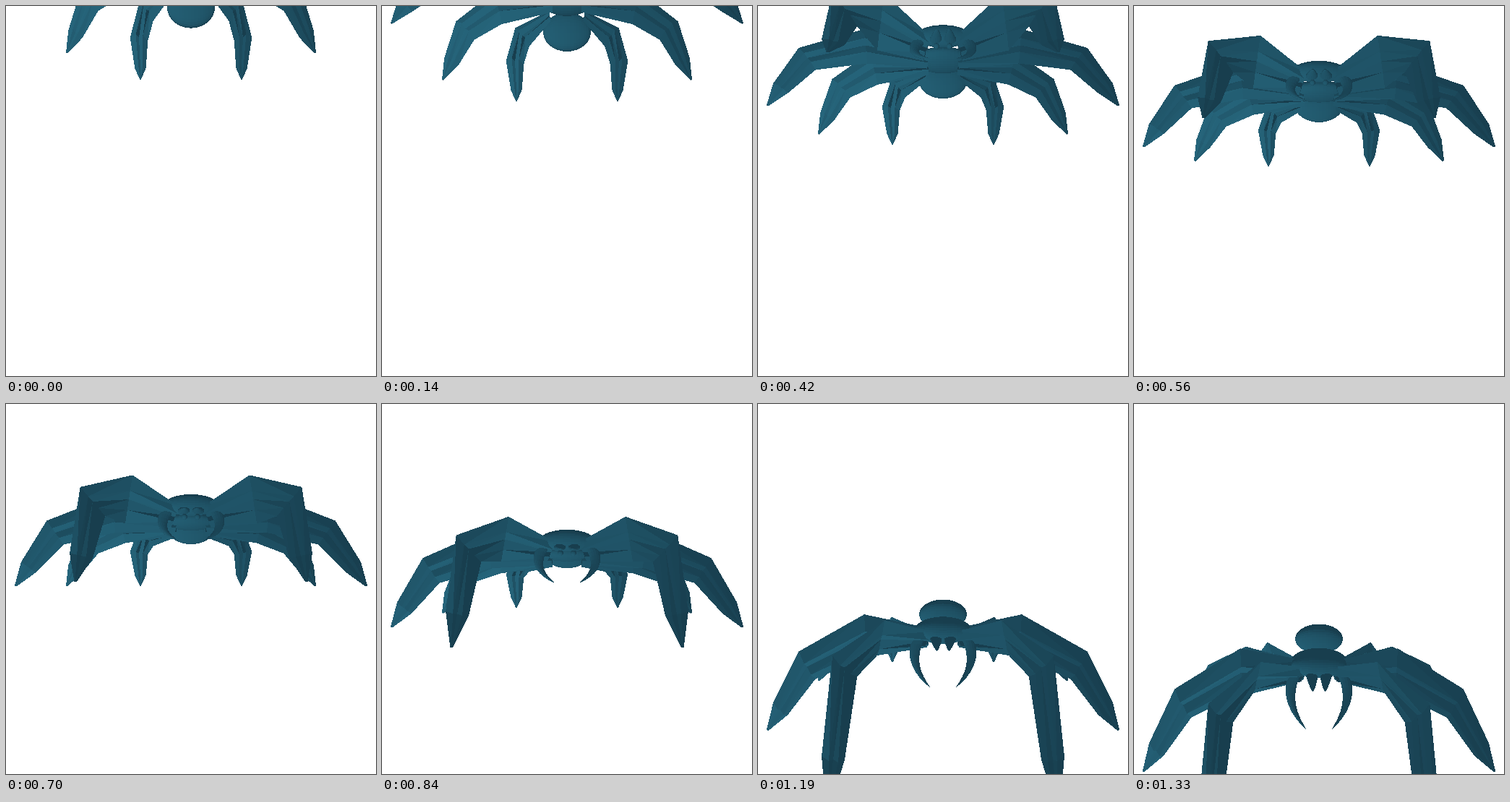
Write an HTML page with a canvas that moves like this. It is 512 px wide and 512 px high and loops after 1400 ms.

```html
<!DOCTYPE html>
<html lang="en">
<head>
<meta charset="utf-8">
<title>Spider</title>
<style>
html, body { margin: 0; width: 100%; height: 100%; overflow: hidden; background: #fff; }
canvas { display: block; width: 512px; height: 512px; }
</style>
</head>
<body>
<canvas id="stage" width="512" height="512"></canvas>
<script>
const SIZE = 512, STEPS = 20, STEP_MS = 70, GROUND = 252;
const LIGHT = [-0.35, -0.5, 0.79];
const ctx = document.getElementById('stage').getContext('2d');
const triangles = [];

// Points are [x, height, depth]; larger depth is nearer to the viewer.
const mix = (a, b, t) => a.map((v, i) => v + (b[i] - v) * t);
const sub = (a, b) => a.map((v, i) => v - b[i]);
const dot = (a, b) => a[0] * b[0] + a[1] * b[1] + a[2] * b[2];
const cross = (a, b) => [
  a[1] * b[2] - a[2] * b[1], a[2] * b[0] - a[0] * b[2], a[0] * b[1] - a[1] * b[0]];
const mean = points => points[0].map((_, i) =>
  points.reduce((sum, p) => sum + p[i], 0) / points.length);
const mirror = ([x, h, z]) => [SIZE - x, h, z];
const clamp = (v, lo, hi) => Math.max(lo, Math.min(hi, v));
const repeat = (count, make) => Array.from({ length: count }, (_, i) => make(i));

function shade(points, inside) {
  const normal = cross(sub(points[1], points[0]), sub(points[2], points[0]));
  const length = Math.hypot(...normal);
  if (length < 1e-6) return null;
  const center = mean(points);
  const outward = dot(normal, sub(center, inside)) < 0 ? -1 : 1;
  const lit = Math.max(0, outward * dot(normal, LIGHT) / length);
  const k = lit * clamp(1.12 - center[0] / 480, 0.12, 1);
  return [24 + 18 * k, 62 + 50 * k, 78 + 58 * k];
}

function addTriangle(points, inside) {
  const color = shade(points, inside);
  if (color) triangles.push({ points, color });
}

function skin(rings) {
  for (let i = 1; i < rings.length; i++) {
    const a = rings[i - 1], b = rings[i];
    const inside = mean([mean(a), mean(b)]);
    a.forEach((p, j) => {
      const k = (j + 1) % a.length;
      addTriangle([p, a[k], b[k]], inside);
      addTriangle([p, b[k], b[j]], inside);
    });
  }
}

function skinPair(rings) {
  skin(rings);
  skin(rings.map(ring => ring.map(mirror)));
}

// A bladed limb through hip, thigh, knee, shin and tip, with two front ridges.
function leg(width, lean, ...joints) {
  const taper = [0.45, 1, 0.78, 0.48, 0.05];
  const heading = (from, to) => {
    const [dx, dh] = sub(to, from), length = Math.hypot(dx, dh);
    return [dx / length, dh / length];
  };
  skinPair(joints.map((joint, i) => {
    const last = joints.length - 1;
    const into = heading(joints[Math.max(i, 1) - 1], joints[Math.max(i, 1)]);
    const out = heading(joints[Math.min(i, last - 1)], joints[Math.min(i, last - 1) + 1]);
    const [dx, dh] = heading([0, 0], [into[0] + out[0], into[1] + out[1]]);
    const half = width * taper[i], thick = Math.min(1, half / 15);
    const across = (t, dz) => [
      joint[0] + dh * half * t,
      joint[1] - dx * half * t,
      joint[2] - dx * half * t * lean + dz * thick];
    return [across(1, 0), across(0.36, 7), across(0, 3),
            across(-0.44, 7), across(-1, 0), across(0, -6)];
  }));
}

const circle = (count, make) => repeat(count, i => {
  const a = i / count * Math.PI * 2;
  return make(Math.cos(a), Math.sin(a));
});

function ellipsoid([x, h, z], [rx, rh, rz], tilt = 0) {
  return repeat(25, i => {
    const a = i / 24 * Math.PI, r = Math.sin(a);
    return circle(32, (c, s) => [
      x - rx * Math.cos(a), h + rh * r * c, z + rz * r * s + tilt * r * c]);
  });
}

// A curved spike from root to tip, pulled towards the bend point.
function spike(root, bend, tip, radius) {
  skinPair(repeat(11, i => {
    const t = i / 10, r = radius * (1 - t) ** 0.7 + 0.3;
    const [x, h, z] = mix(mix(root, bend, t), mix(bend, tip, t), t);
    return circle(14, (c, s) => [x + r * c, h + r * 0.6 * s, z + r * 0.3 * s]);
  }));
}

leg(16, 0, [232, 74, 205], [194, 68, 176], [184, 46, 160], [186, 15, 151], [186, 0, 150]);
leg(23, 0, [236, 80, 217], [160, 82, 209], [115, 58, 200], [96, 24, 189], [84, 0, 187]);
leg(26, -0.2, [236, 86, 225], [149, 100, 241], [68, 74, 262], [31, 26, 280], [13, 0, 285]);
leg(34, 0.4, [234, 96, 242], [170, 120, 274], [120, 117, 325], [104, 42, 400], [96, 6, 455]);

const abdomen = ellipsoid([256, 80, 170], [33, 22, 11], 4.4);
const thorax = ellipsoid([256, 90, 218], [40, 13, 22], 8);
const head = ellipsoid([256, 112, 245], [38, 15, 12]);
[abdomen, thorax, head].forEach(skin);
skinPair(ellipsoid([247, 96, 251], [4, 4, 4]));

spike([224, 106, 248], [204, 78, 263], [238, 63, 290], 9);
spike([246, 104, 250], [247, 106, 266], [247.5, 108, 282], 9);

function fill({ points, color }, slope, pixels, depth) {
  const [a, b, c] = points.map(([x, h, z]) => [x, GROUND - h + z * slope, z]);
  const area = (b[0] - a[0]) * (c[1] - a[1]) - (b[1] - a[1]) * (c[0] - a[0]);
  if (Math.abs(area) < 1e-6) return;
  const low = i => Math.max(0, Math.floor(Math.min(a[i], b[i], c[i])));
  const high = i => Math.min(SIZE - 1, Math.ceil(Math.max(a[i], b[i], c[i])));
  const x0 = low(0), x1 = high(0), y0 = low(1), y1 = high(1);
  for (let y = y0; y <= y1; y++) {
    for (let x = x0; x <= x1; x++) {
      const px = x + 0.5, py = y + 0.5;
      const u = ((b[0] - px) * (c[1] - py) - (b[1] - py) * (c[0] - px)) / area;
      const v = ((c[0] - px) * (a[1] - py) - (c[1] - py) * (a[0] - px)) / area;
      const w = 1 - u - v;
      if (u < 0 || v < 0 || w < 0) continue;
      const z = u * a[2] + v * b[2] + w * c[2], at = y * SIZE + x;
      if (z <= depth[at]) continue;
      depth[at] = z;
      for (let k = 0; k < 3; k++) pixels[at * 4 + k] = color[k];
    }
  }
}

// The view tilts steadily: height on screen is sheared by depth.
function render(step) {
  const image = ctx.createImageData(SIZE, SIZE);
  image.data.fill(255);
  const depth = new Float32Array(SIZE * SIZE);
  for (const triangle of triangles) fill(triangle, step / 10 - 1, image.data, depth);
  return image;
}

const views = repeat(STEPS, render);
const start = performance.now();

function play() {
  const step = Math.floor((performance.now() - start) / STEP_MS) % STEPS;
  ctx.putImageData(views[step], 0, 0);
  requestAnimationFrame(play);
}
play();
</script>
</body>
</html>
```
